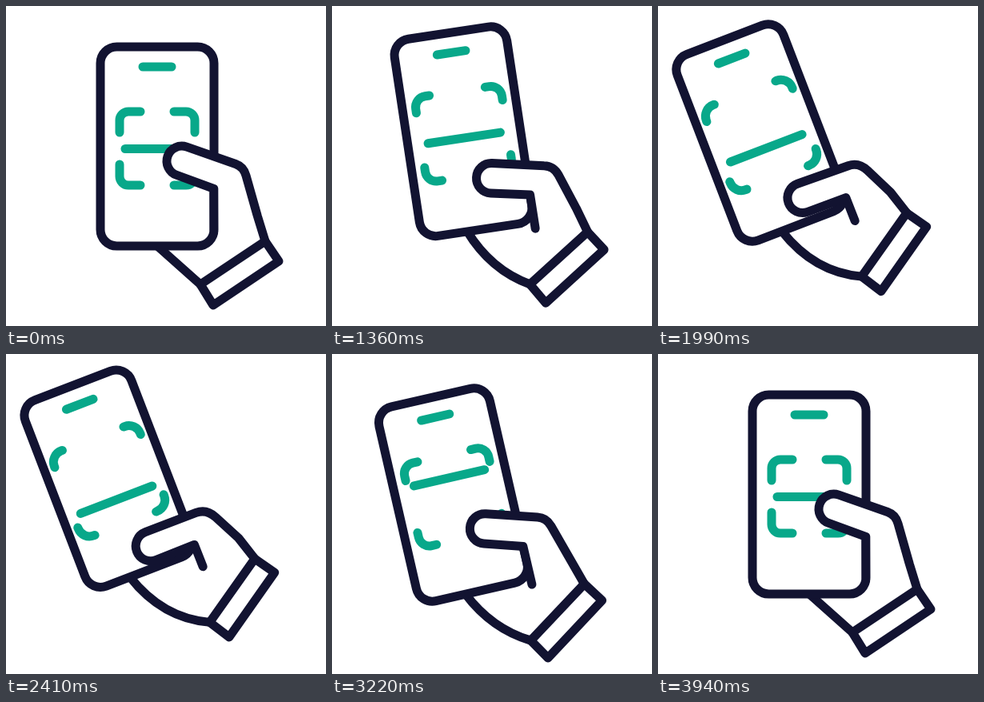
Animation of 400 by 400 pixels, one loop 3.97 s. Source, as an HTML page:

```html
<!DOCTYPE html>
<html lang="en">
<head>
<meta charset="utf-8">
<title>Phone scan</title>
<style>
  html, body { margin: 0; width: 100%; height: 100%; overflow: hidden; background: #fff; }
  svg { display: block; width: 100vw; height: 100vh; }
  path, rect { fill: none; stroke: #121331; stroke-width: 11; stroke-linecap: round; stroke-linejoin: round; }
  .white { fill: #fff; }
  .accent path { stroke: #08a88a; }
</style>
</head>
<body>
<svg viewBox="0 0 400 400">
  <g id="whole">
    <path id="palm"/>
    <g id="phone">
      <rect class="white" x="-71" y="-124.5" width="142" height="249" rx="20.5"/>
      <g class="accent">
        <path d="M-18 -99.5H18"/>
        <path id="brackets"/>
        <path id="scan"/>
      </g>
    </g>
    <path id="hand" class="white"/>
    <path class="white" d="M324 294L341 319L259 374L243 348Z"/>
  </g>
</svg>
<script>
const LOOP = 3970, STEP = 30;
const WRIST = [291.75, 333.75];

// Each track lists [time in ms, value].
const tracks = {
  angle: [[1000, 0], [1030, -0.1], [1290, -6], [1540, -16.5], [1660, -20], [1830, -21],
          [3000, -21], [3190, -14.5], [3470, 2.6], [3700, 1], [3930, 0]],
  x: [[1000, 291.75], [1660, 295], [2950, 295.1], [3460, 291], [3930, 291.75]],
  y: [[1000, 333.75], [1300, 329], [1540, 315.3], [1660, 310.5], [2110, 306.5], [2400, 304.6],
      [2620, 307.3], [2950, 315.2], [3160, 329.5], [3350, 339.8], [3440, 341], [3700, 329.3], [3940, 333.75]],
  slide: [[1000, 0], [1250, 0.4], [1500, 1], [3000, 1], [3190, 0.73], [3440, 0]],
  thumb: [[1000, 0], [1660, 0.79], [2400, 1], [2950, 0.65], [3460, -0.2], [3930, 0]],
  scan: [[1000, 3], [1030, 3.6], [1660, 12.6], [2420, 28.4], [2950, -7.3], [3250, -22], [3460, -16.2], [3930, 3]]
};

const $ = id => document.getElementById(id);
const mix = (a, b, k) => a + (b - a) * k;
const mixPoint = (a, b, k) => [mix(a[0], b[0], k), mix(a[1], b[1], k)];
const setPath = (id, d) => $(id).setAttribute('d', d);

// Smooth interpolation that never overshoots its keys.
function sample(keys, t) {
  const last = keys.length - 1;
  if (t <= keys[0][0]) return keys[0][1];
  if (t >= keys[last][0]) return keys[last][1];
  const i = keys.findIndex(key => key[0] > t) - 1;
  const secant = n => (keys[n + 1][1] - keys[n][1]) / (keys[n + 1][0] - keys[n][0]);
  const slope = n => {
    if (n === 0 || n === last) return 0;
    const a = secant(n - 1), b = secant(n);
    return a * b <= 0 ? 0 : 2 * a * b / (a + b);
  };
  const [t0, v0] = keys[i], [t1, v1] = keys[i + 1];
  const d = t1 - t0, u = (t - t0) / d, w = 1 - u;
  return v0 * w * w * (1 + 2 * u) + v1 * u * u * (3 - 2 * u)
    + d * u * w * (slope(i) * w - slope(i + 1) * u);
}

function bracket(sx, y, sy, k) {
  const x = sx * mix(47, 57.5, k), arm = mix(26, 16.5, k), r = mix(11, 15, k);
  const sweep = sx * sy > 0 ? 0 : 1;
  return `M${x} ${y - sy * arm}V${y - sy * r}A${r} ${r} 0 0 ${1 - sweep} ${x - sx * r} ${y}H${x - sx * arm}`;
}

function handPath(k) {
  const r = 18.7, tilt = mix(19.5, -0.5, k) * Math.PI / 180;
  const [cx, cy] = mixPoint([219.7, 193.8], [208.3, 232.6], k);
  const dx = r * Math.sin(tilt), dy = r * Math.cos(tilt);
  const from = mixPoint([300, 212], [297, 228], k);
  const knuckle = mixPoint([297, 201], [290, 214], k);
  const to = mixPoint([287, 197.5], [276, 214], k);
  const crease = mix(228.3, 250.6, Math.max(k, 0));
  return `M324 294L314.3 262.5L${from}Q${knuckle} ${to}L${cx + dx} ${cy - dy}`
    + `A${r} ${r} 0 0 0 ${cx - dx} ${cy + dy}L259.8 ${crease}L260 280`;
}

function draw(time) {
  const t = Math.floor((time - 10) / STEP) * STEP + 10;
  const pose = {};
  for (const name in tracks) pose[name] = sample(tracks[name], t);
  const k = pose.slide;

  $('whole').setAttribute('transform',
    `translate(${pose.x} ${pose.y}) rotate(${pose.angle}) translate(${-WRIST[0]} ${-WRIST[1]})`);
  $('phone').setAttribute('transform', `translate(189 ${175.5 - 40.7 * k})`);

  const top = mix(-43.5, -53.5, k), bottom = mix(48.5, 60, k);
  setPath('brackets', [-1, 1].map(s => bracket(s, top, -1, k) + bracket(s, bottom, 1, k)).join(''));
  const half = mix(40, 48, k);
  setPath('scan', `M${-half} ${pose.scan}H${half}`);

  const start = mixPoint([188, 299], [170, 259], k);
  const bend = mixPoint([215.5, 323.5], [189.5, 322.5], k);
  setPath('palm', `M${start}Q${bend} 243 348`);
  setPath('hand', handPath(pose.thumb));
}

const begin = performance.now();
function frame() {
  draw((performance.now() - begin) % LOOP);
  requestAnimationFrame(frame);
}
draw(0);
requestAnimationFrame(frame);
</script>
</body>
</html>
```
